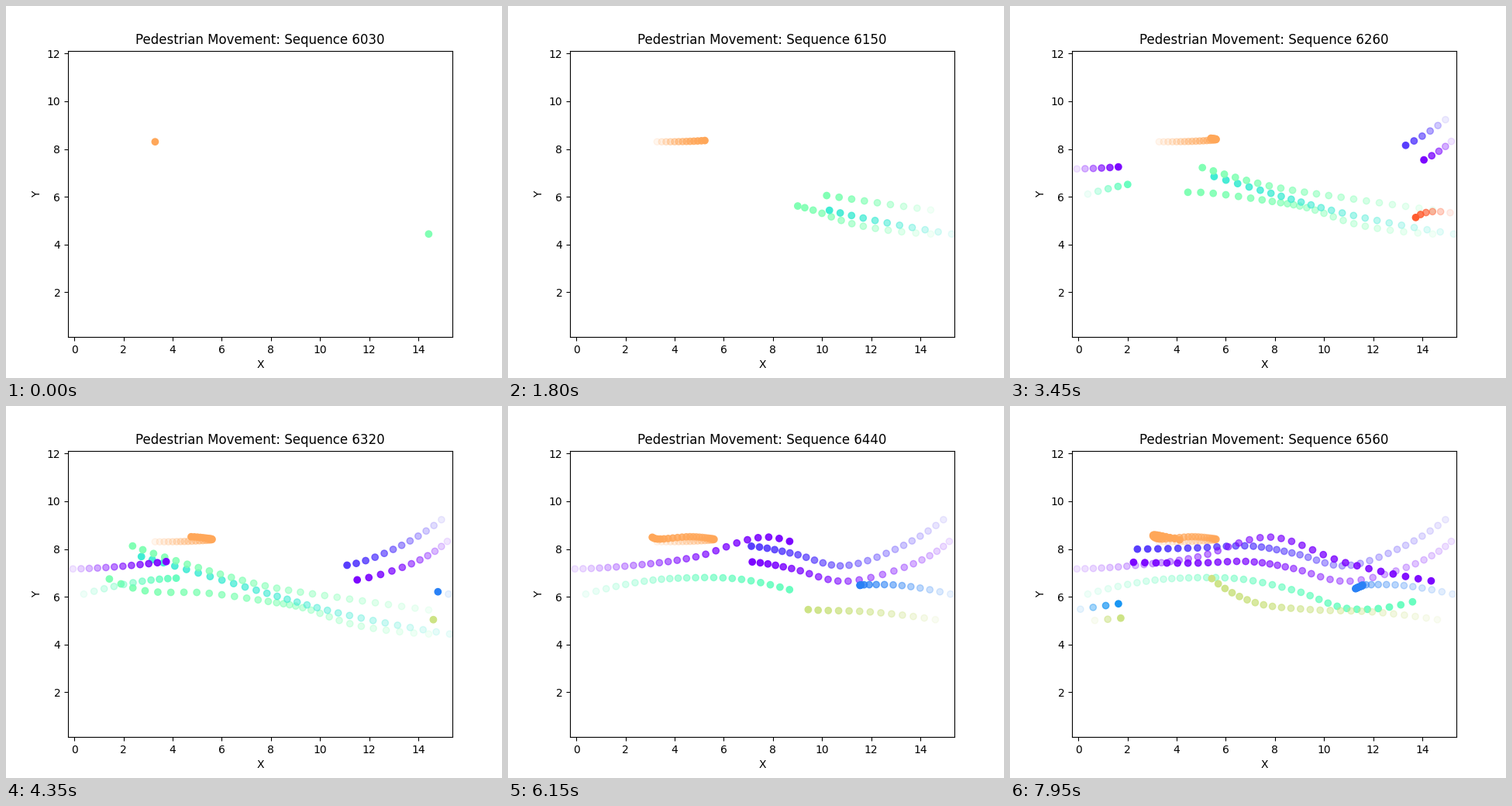
A matplotlib script for the animation above (8 s loop, 640 by 480 pixels).

```python
import matplotlib.pyplot as plt
import numpy as np
from matplotlib.animation import FuncAnimation

INTERVAL = 50          # ms per drawn frame
TICKS_PER_STEP = 3     # a new position every 150 ms
TOTAL_TICKS = 160
FIRST_SEQUENCE = 6030

# Stage pixels per unit, and the stage position of the data origin
SCALE = np.array([31.7, -30.8])
ORIGIN = np.array([87.8, 430.3])

walks = []


def smooth_path(points, count):
    """Sample a smooth curve through points that are evenly spaced in time."""
    points = np.array(points, float)
    last = len(points) - 1
    slopes = np.gradient(points, axis=0, edge_order=min(2, last))
    t = np.linspace(0, last, count)
    i = np.minimum(t.astype(int), last - 1)
    u = (t - i)[:, None]
    v = 1 - u
    return (v * v * ((1 + 2 * u) * points[i] + u * slopes[i])
            + u * u * ((1 + 2 * v) * points[i + 1] - v * slopes[i + 1]))


def walk(hue, first, last, *points):
    """Add a pedestrian seen from step first to step last."""
    path = (smooth_path(points, last - first + 1) - ORIGIN) / SCALE
    walks.append((first, path, plt.cm.rainbow(hue)[:3]))


# Pacing to and fro on the left
walk(.77, 0, 53, (192, 174.5), (232.5, 174), (263.5, 172), (259.5, 170),
     (233, 168), (193, 171), (186, 165.5), (218.5, 172))

# Crossing from right to left
walk(.5, 0, 32, (545, 293.5), (453, 282.5), (386, 260.5), (338, 251.5),
     (256.5, 240.5), (168.5, 235.5), (90, 196))
walk(.375, 2, 36, (572, 293.5), (435.5, 268), (322.5, 237), (195.5, 199.5),
     (80, 169))
walk(.5, 4, 36, (545, 262.5), (436.5, 247.5), (337, 232), (245, 207),
     (155.5, 177), (90.5, 144))

# Crossing from left to right
walk(.46, 19, 53, (100, 242), (171.5, 226), (234, 221), (301, 223),
     (371, 238.5), (438.5, 261), (519, 252))

# Turning back at the right edge
walk(.88, 18, 28, (567.5, 266), (534, 266.5), (522, 281), (567, 306.5))

# Second wave
walk(.08, 18, 53, (561.5, 146), (501, 183.5), (432, 205.5), (368.5, 190),
     (310, 180), (239.5, 182.5), (164, 184))
walk(.01, 18, 53, (86, 209.5), (161.5, 205), (242, 194), (336, 168.5),
     (432.5, 201.5), (543, 225))
walk(.01, 19, 53, (569, 174), (515, 206), (434, 225.5), (365.5, 209),
     (307.5, 200), (238, 202), (159, 201))

# Late arrivals
walk(.17, 28, 53, (570.5, 242), (508, 231), (459, 230), (454, 231.5),
     (449.5, 233), (445.5, 235))
walk(.65, 29, 53, (551, 275), (467, 265), (387, 262), (316, 253), (260, 222))
walk(.2, 50, 53, (90.5, 261.5), (139.5, 254.5))
walk(.65, 51, 53, (109, 276), (142.5, 273))

fig, ax = plt.subplots(figsize=(6.4, 4.8), dpi=100)
ax.set(xlim=(-.2587, 15.388), ylim=(.123, 12.123), xlabel="X", ylabel="Y")
title = ax.set_title("")
dots = ax.scatter([], [])


def draw(tick):
    """Show the fading trail of everyone still in the scene."""
    step = tick // TICKS_PER_STEP
    points, colors = [], []
    for first, path, rgb in walks:
        count = step - first + 1
        if not 1 <= count <= len(path):
            continue
        alphas = np.linspace(1, .1, count)[::-1]
        points.extend(path[:count])
        colors.extend((*rgb, alpha) for alpha in alphas)
    dots.set_offsets(points)
    dots.set_facecolor(colors)
    dots.set_edgecolor(colors)
    title.set_text(f"Pedestrian Movement: Sequence {FIRST_SEQUENCE + 10 * step}")
    return dots, title


animation = FuncAnimation(fig, draw, frames=TOTAL_TICKS, interval=INTERVAL,
                          repeat=True, repeat_delay=0)
plt.show()
```
